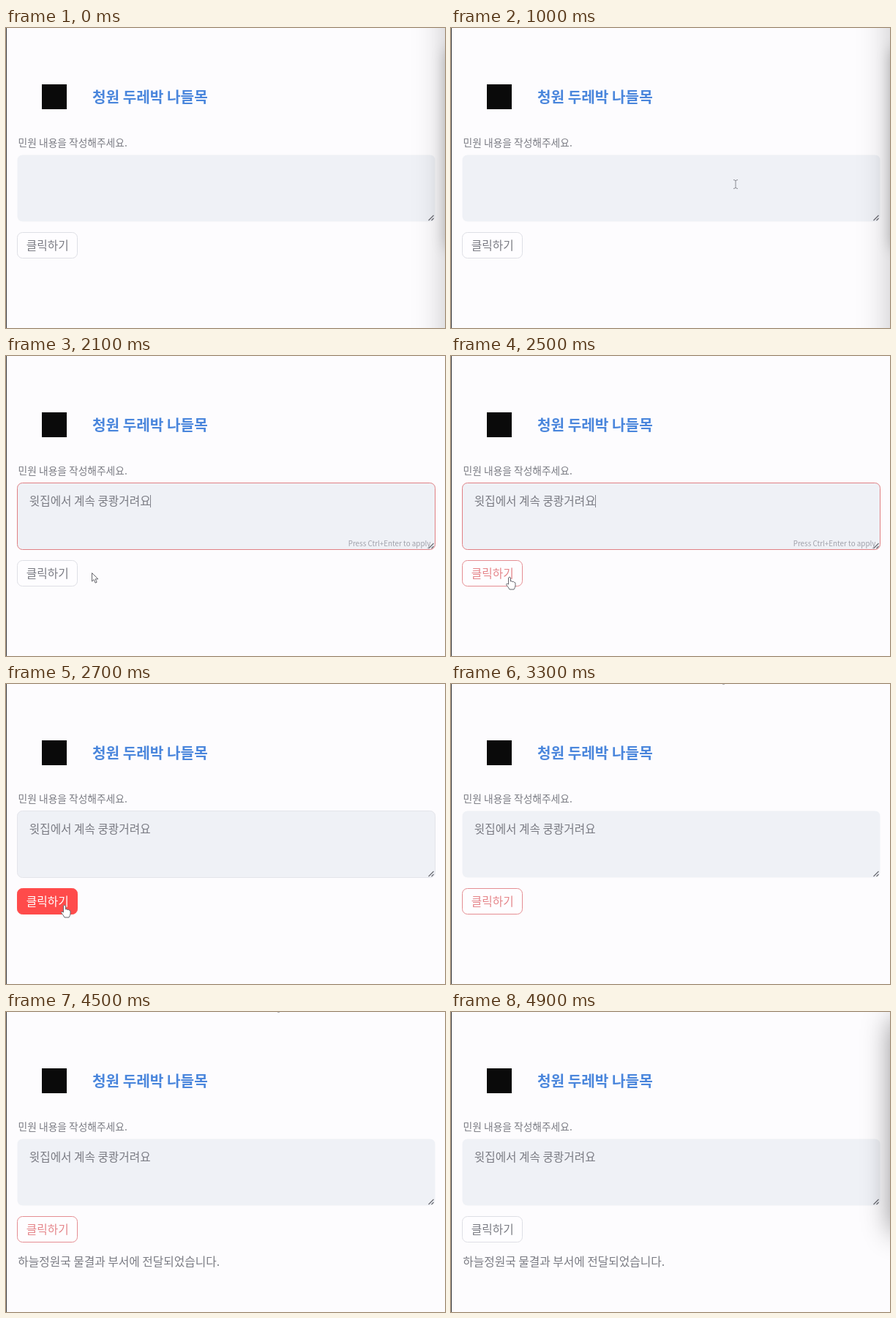
An HTML page with a canvas that plays this animation: 600x410 px, repeating every 5 s.

```html
<!DOCTYPE html>
<html lang="ko">
<head>
<meta charset="utf-8">
<style>
html, body { margin: 0; width: 100%; height: 100%; overflow: hidden; background: #fdfcfe; }
canvas { display: block; }
</style>
</head>
<body>
<canvas id="stage" width="600" height="410" lang="ko"></canvas>
<script>
const ctx = document.getElementById('stage').getContext('2d');
const LOOP = 5000, STEP = 100;
const FONT = '"Noto Sans CJK KR", "Noto Sans CJK", "Noto Sans CJK JP", sans-serif';
const MESSAGE = '윗집에서 계속 쿵쾅거려요';
const INK = '#7a7b83', RED = '#ff4b4b';

// y is the middle of the Hangul glyphs
function label(text, x, y, size, color, weight = 400) {
  ctx.font = `${weight} ${size}px ${FONT}`;
  ctx.fillStyle = color;
  ctx.fillText(text, x, y + size * 0.38);
  return x + ctx.measureText(text).width;
}

function box(x, y, w, h, radius, fill, stroke) {
  ctx.beginPath();
  ctx.roundRect(x, y, w, h, radius);
  ctx.fillStyle = fill;
  ctx.fill();
  if (!stroke) return;
  ctx.strokeStyle = stroke;
  ctx.lineWidth = 1;
  ctx.stroke();
}

function line(color, width, ...points) {
  ctx.beginPath();
  points.forEach(([x, y], i) => i ? ctx.lineTo(x, y) : ctx.moveTo(x, y));
  ctx.strokeStyle = color;
  ctx.lineWidth = width;
  ctx.stroke();
}

function outline(d) {
  const path = new Path2D(d);
  ctx.fillStyle = '#fff';
  ctx.fill(path);
  ctx.strokeStyle = '#66666d';
  ctx.lineWidth = 1;
  ctx.stroke(path);
}

const pointers = {
  beam() {
    const color = '#8b8c93';
    line(color, 1, [-3, -6], [-0.8, -5.5], [0, -4.5], [0.8, -5.5], [3, -6]);
    line(color, 1, [0, -5], [0, 5]);
    line(color, 1, [-3, 6], [-0.8, 5.5], [0, 4.5], [0.8, 5.5], [3, 6]);
  },
  arrow() {
    outline('M0 0V11.5L2.7 9L4.6 13.6L6.6 12.7L4.7 8.3H8.4Z');
  },
  hand() {
    outline('M-1.5 1Q0 -1 1.5 1V6Q3 5 4 6.5Q5.5 5.7 6.3 7.2Q8 7 8 9V12Q7.5 15 6 17H0Q-2 13.5 -4.5 10.5Q-4.5 8.2 -1.5 10Z');
  }
};

// each pointer travels from "start" to "end", then rests until "until"
const moves = [
  { kind: 'beam', start: 500, end: 1000, until: 1500, from: [477, 254], to: [389, 213.5] },
  { kind: 'beam', start: 2000, end: 2000, until: 2000, from: [250, 250], to: [250, 250] },
  { kind: 'arrow', start: 2100, end: 2200, until: 2200, from: [117.5, 296.5], to: [102, 300] },
  { kind: 'hand', start: 2300, end: 2500, until: 2900, from: [86, 302], to: [80, 302] },
  { kind: 'arrow', start: 3000, end: 3200, until: 3200, from: [150, 330], to: [404, 398] }
];

function drawPointer(t) {
  const move = moves.find(m => t >= m.start && t <= m.until);
  if (!move) return;
  const p = Math.min(1, (t - move.start) / (move.end - move.start || 1));
  const ease = 1 - (1 - p) ** 2;
  const [x, y] = move.from.map((a, i) => a + (move.to[i] - a) * ease);
  ctx.save();
  ctx.translate(x, y);
  pointers[move.kind]();
  ctx.restore();
}

function drawTextarea(t) {
  const focused = t >= 1500 && t < 2700;
  const border = focused ? (t < 1600 ? '#eeaaaa' : '#e08084') : t >= 2700 && t < 2800 ? '#e3e4ea' : null;
  box(15.5, 173.5, 571, 91, 7, '#eff1f6', border);
  line('#66676e', 1.1, [577.5, 263], [584.5, 256]);
  line('#66676e', 1.1, [581.5, 263], [584.5, 260]);

  const shown = t < 1500 ? 0 : Math.min(MESSAGE.length, (t - 1500) / STEP * 3);
  const end = label(MESSAGE.slice(0, shown), 31.8, 198, 15.7, INK);
  if (!focused) return;
  const caret = Math.round(end) - 0.5;
  line('#85868e', 1, [caret, 190], [caret, 207]);
  if (!shown) return;
  ctx.textAlign = 'right';
  label('Press Ctrl+Enter to apply', 580.5, 256.5, 9.85, '#a0a1aa');
  ctx.textAlign = 'left';
}

function drawButton(t) {
  const pressed = t >= 2700 && t < 2900;
  const active = t >= 2300 && t < 4700;
  const fill = pressed ? RED : '#fefdff';
  const border = pressed ? RED : active ? '#e58d92' : '#dedfe5';
  box(15.5, 279.5, 82, 35, 7, fill, border);
  label('클릭하기', 27.8, 296.7, 15.75, pressed ? '#fff' : active ? '#e5858a' : INK);
}

function edgeShadow(top, bottom, blur, alpha) {
  ctx.save();
  ctx.shadowColor = `rgba(0,0,0,${alpha})`;
  ctx.shadowBlur = blur;
  ctx.shadowOffsetX = -400;
  ctx.fillStyle = '#000';
  ctx.fillRect(1002, top, 200, bottom - top);
  ctx.restore();
}

function drawEdgeShadows(t) {
  if (t < 1500) {
    edgeShadow(-100, 510, 44, 0.24);
    edgeShadow(30, 300, 18, 0.26);
  } else if (t >= 4700) {
    edgeShadow(10, 300, 36, 0.45);
  }
}

function draw(t) {
  ctx.fillStyle = '#fdfcfe';
  ctx.fillRect(0, 0, 600, 410);

  ctx.fillStyle = '#0a0a0a';
  ctx.fillRect(49, 77, 34, 34);
  label('청원 두레박 나들목', 118, 94.3, 20.2, '#4a86dc', 700);
  label('민원 내용을 작성해주세요.', 16.6, 157, 13.75, INK);

  drawTextarea(t);
  drawButton(t);
  if (t >= 4500) label('하늘정원국 물결과 부서에 전달되었습니다.', 16.3, 341, 15.75, INK);

  drawEdgeShadows(t);
  drawPointer(t);
  if (t >= 3300 && t < 4700) {
    ctx.fillStyle = '#b5b5ba';
    ctx.fillRect(371, 0, 3, 1);
  }
  ctx.fillStyle = '#3c3c40';
  ctx.fillRect(0, 0, 1, 410);
}

const origin = performance.now();
function tick() {
  const elapsed = Math.max(0, performance.now() - origin) % LOOP;
  draw(Math.floor(elapsed / STEP) * STEP);
  requestAnimationFrame(tick);
}
tick();
</script>
</body>
</html>
```
